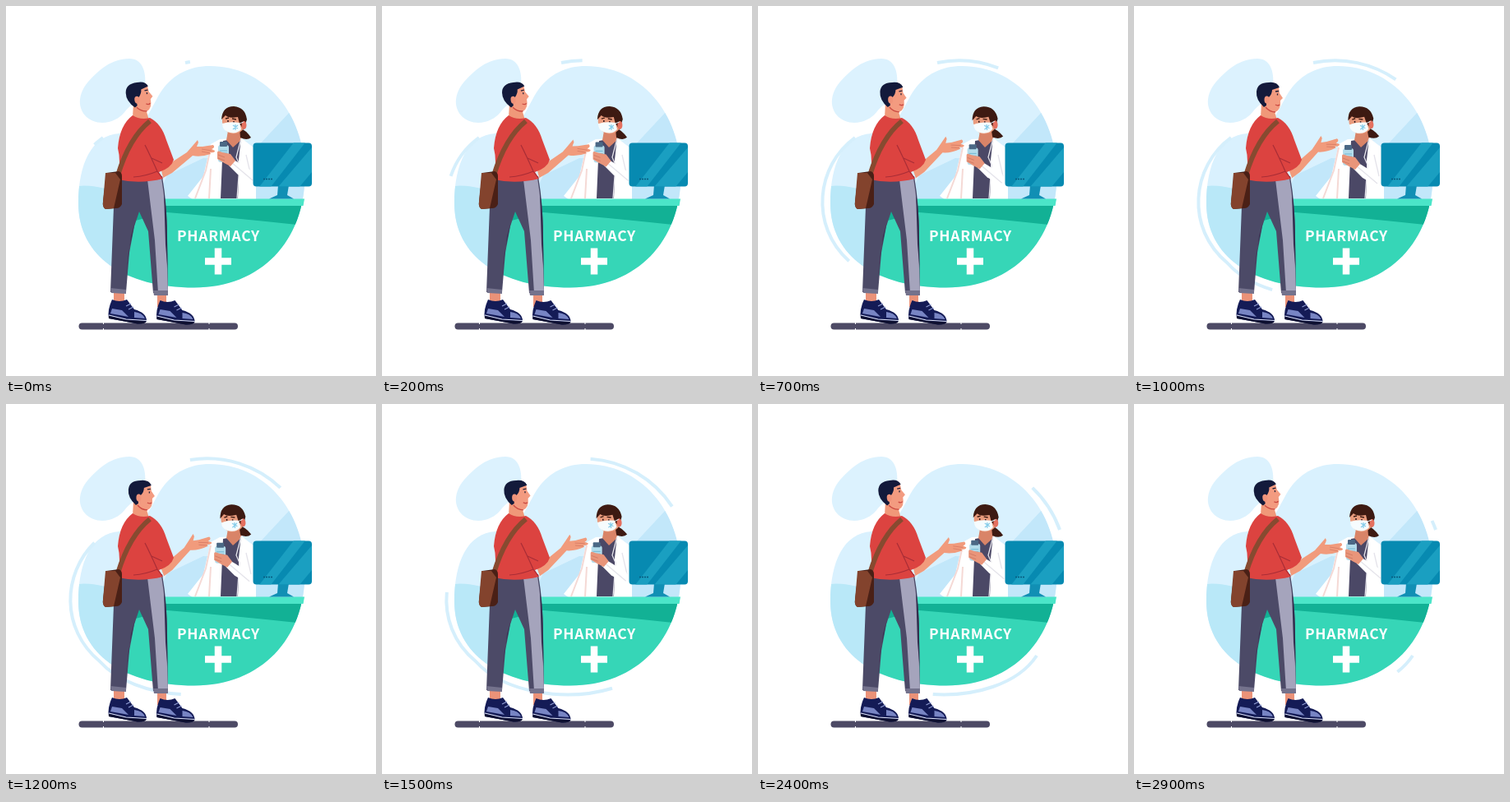
Write an HTML page that moves like this. It is 450 px wide and 450 px high and loops after 3 s.

```html
<!DOCTYPE html>
<html lang="en">
<head>
<meta charset="utf-8">
<title>Pharmacy</title>
<style>
html, body { margin: 0; width: 100%; height: 100%; overflow: hidden; background: #fff; }
svg { display: block; width: 100vw; height: 100vh; }
.arc { fill: none; stroke: #d5effc; stroke-width: 4; }
</style>
</head>
<body>
<svg viewBox="0 0 450 450">
  <defs>
    <clipPath id="blob"><path d="M248 73C313 73 363.5 128 363.5 205C363.5 286 310 342.5 229 342.5C145 342.5 88 305 88 240C88 192 104 157 138 155C170 153 177 120 190 102C204 83 223 73 248 73Z"/></clipPath>
    <clipPath id="screen"><rect x="300.5" y="166.5" width="71.5" height="53" rx="4"/></clipPath>
  </defs>

  <!-- backdrop -->
  <path d="M150 64C166 64 171 80 169 98C167 113 154 117 145 128C133 144 109 147 96 133C86 121 89 105 100 92C113 78 128 64 150 64Z" fill="#dcf2fe"/>
  <g clip-path="url(#blob)">
    <rect x="80" y="65" width="290" height="285" fill="#d9f1fe"/>
    <path d="M180 240L196 206L240 185L290 188L346 128L372 165V240Z" fill="#c2e7fa"/>
    <path d="M80 220Q112 214 150 234V345H80Z" fill="#b9e8f8"/>
    <path d="M146 238H364V345H146Z" fill="#36d6b7"/>
    <path d="M146 243H364L354 266Q270 257 196 251L146 264Z" fill="#12b195"/>
  </g>
  <path class="arc" pathLength="1" d="M218 69C283 56 345 92 367 153"/>
  <path class="arc" pathLength="1" d="M118 160C70 195 62 270 114 313C163 368 298 368 339 306"/>

  <!-- pharmacist -->
  <path d="M260 162L249 168L240 207L221 231L228 236H304V174L286 161Z" fill="#fff"/>
  <path d="M249 172L243 200L230 234M249 198L247 234" fill="none" stroke="#f5d9d5" stroke-width="2"/>
  <path d="M264 164L286 160L283 187V234H261Z" fill="#4b4866"/>
  <path d="M270 152H285L287 162L276 172L268 163Z" fill="#d98468"/>
  <path d="M286 160L302 174V234H282L284 188Z" fill="#fff"/>
  <path d="M286 161L280 184L284 193L281 234M292 181L298 207" fill="none" stroke="#e4e3ea" stroke-width="1.3"/>
  <g id="nurseHead">
    <path d="M284 148Q292 151 298 160Q293 164 285 160Z" fill="#3d1a12"/>
    <path d="M263 133Q276 125 289 133L290 148Q284 157 273 155Q264 152 263 141Z" fill="#e99b7d"/>
    <path d="M262 138Q263 122 277 122Q291 123 293 138L289 150L284 143L282 135Q271 137 267 133Z" fill="#3d1a12"/>
    <ellipse cx="289.5" cy="145" rx="3" ry="5" fill="#e4705f"/>
    <path d="M267 137l4-1M275 137l5 1" stroke="#3d1a12" stroke-width="1.4"/>
    <path d="M270 139v2M277 140v2" stroke="#29151b" stroke-width="1.5"/>
    <path d="M263 143Q272 140 284 142L286 150Q280 157 269 153Q263 150 263 143Z" fill="#f6fcfe"/>
    <path d="M276 145l6 4m0-4l-6 5m3-6v7" stroke="#83cbe9" stroke-width="1.2"/>
    <path d="M284 143l5-2" stroke="#e5f4fa"/>
  </g>
  <g id="bottle">
    <path d="M270 183L282 190L301 202V216L282 205L271 194Z" fill="#fff"/>
    <path d="M274 190L300 212" stroke="#e4e3ea" stroke-width="1.3"/>
    <rect x="258" y="169" width="13" height="21" rx="3" fill="#b3dceb"/>
    <rect x="260" y="165" width="9" height="6" rx="1" fill="#4b6885"/>
    <path d="M260 176h9M260 179h9" stroke="#6fb7d3"/>
    <path d="M257 178Q257 175 263 178L273 180L279 188L273 195Q265 191 257 186Z" fill="#e9957a"/>
    <path d="M258 181l8 3m-8 1l8 3" stroke="#cc7560" stroke-width=".8"/>
  </g>

  <!-- counter and monitor -->
  <path d="M146 234.5H363L361.5 243H146Z" fill="#4be5c8"/>
  <path d="M331 218H344L342 230L350 234.5H320L330 230Z" fill="#118fb4"/>
  <g clip-path="url(#screen)">
    <rect x="300" y="166" width="73" height="54" fill="#078ab1"/>
    <path d="M350 166H364L322 220H308ZM372 172V202L357 220H331Z" fill="#1a9fc1"/>
  </g>
  <path d="M313 210.5h11" stroke="#07597d" stroke-width="1.5" stroke-dasharray="2 1"/>
  <text x="208" y="286" fill="#fff" font-family="'Noto Sans CJK JP', 'Noto Sans CJK SC', Roboto, sans-serif" font-size="17.5" font-weight="900" letter-spacing=".7">PHARMACY</text>
  <path d="M258 294.5V326.5M242 310.5H274" stroke="#fff" stroke-width="8.5"/>

  <!-- ground and shoes -->
  <path d="M92.5 389.5H278" stroke="#4d4a65" stroke-width="8" stroke-linecap="round"/>
  <path d="M118.5 385v2m0 5v2M247 385v2m0 5v2" stroke="#fff"/>
  <path d="M131 344H144V364H131ZM184 346H195V366H184Z" fill="#eb9278"/>
  <g id="shoe">
    <path d="M129 357Q138 361 147 357L156 369Q171 373 171 383Q169 387 160 386.5L125 380Q123 370 129 357Z" fill="#141b56"/>
    <path d="M129 368L141 370L149 378L127 374ZM156 372Q166 373 169 380L156 379Z" fill="#7885c4"/>
    <path d="M125 376L146 381L171 382.5" fill="none" stroke="#dfe4f6" stroke-width="1.2"/>
    <path d="M125 377L146 382L171 383.5Q169 387 160 386.5L125 380Z" fill="#0e1030"/>
    <path d="M146 365l6-3m-3 7l6-3" stroke="#8f9cd3" stroke-width="1.2"/>
  </g>
  <use href="#shoe" x="58.5" y="1"/>

  <!-- customer -->
  <path d="M137 209L190 207Q196 242 196 280L197 349H179L173 274L162 250L156 268L150 300L146 348H127L131 244Z" fill="#4c4a67"/>
  <path d="M172 211L189 209Q195 245 195 290L197 349H185L181 285Z" fill="#a5a4bc"/>
  <path d="M192 226Q196 250 196 285L196.500 320L194 290Z" fill="#322e4e"/>
  <path d="M162 250L172 232M157 262L149 300L146 330L152 280Z" fill="#373454"/>
  <path d="M127 343L146 345V350L128 349ZM179 346H197V352H180Z" fill="#74728c"/>
  <g id="forearm">
    <path d="M187 191L200 191L220 178L227 170L233 163L234 166L232 171L239 171L252 169Q255 172 250 174L254 176Q254 179 248 178L249 180Q237 184 227 182L202 203L191 209Z" fill="#f19b7c"/>
    <path d="M238 174l12 2m-12 1l10 2" stroke="#d67a65" stroke-width=".8"/>
  </g>
  <path d="M155 118H168L174 139Q163 145 154 136Z" fill="#f09879"/>
  <g id="manHead">
    <path d="M160 101L176 98L177 106L181 112L178 115Q179 126 172 129L162 127L157 118Z" fill="#f39b80"/>
    <path d="M149 104Q150 93 164 93Q174 92 177 99L168 102Q168 107 164 111L161 111V121L158 123Q148 114 149 104Z" fill="#131a3b"/>
    <ellipse cx="161.500" cy="114" rx="3" ry="4.5" fill="#f0937a"/>
    <path d="M172 104l4-.5M174.500 106.500v2" stroke="#242037" stroke-width="1.3"/>
    <path d="M172 120q3 2 5 0M160 123Q165 129 172 129" fill="none" stroke="#cb4a42" stroke-width="1.3"/>
  </g>
  <path d="M154 133Q163 139 175 136Q189 143 195 163L204 187Q201 197 186 202L191 210Q163 217 136 211Q140 188 136 173Q138 145 154 133Z" fill="#dc4340"/>
  <path d="M169 169Q176 183 184 201L190 209M177 185L190 191M155 208Q170 207 184 201" fill="none" stroke="#a92d36" stroke-width="1.2"/>
  <path d="M175 140Q150 160 136 206" fill="none" stroke="#874a30" stroke-width="6"/>
  <path d="M122 203L137 201Q141 202 141 207V241Q139 246 134 246L121 247Q117 244 118 238Z" fill="#4a2016"/>
  <path d="M121 203H133L139 211L131 246L121 247Q117 245 118 238Z" fill="#83432d"/>
</svg>
<script>
const LOOP = 3000, STEP = 100, PEAK = 950, TRAVEL = 1880;
const byId = id => document.getElementById(id);
const arcs = document.querySelectorAll('.arc');
const limit = x => Math.max(0, Math.min(1, x));
const rotate = (id, angle, x, y) =>
  byId(id).setAttribute('transform', `rotate(${angle} ${x} ${y})`);

function draw(now) {
  // The picture advances ten times a second
  const t = Math.floor(now % LOOP / STEP) * STEP;
  const head = limit((t + 60) / TRAVEL);
  const tail = limit((t - 1140) / TRAVEL);
  arcs.forEach(arc => arc.setAttribute('stroke-dasharray', `0 ${tail} ${head - tail} 2`));

  // A quick raise of the hand, followed by a slower return
  const phase = t < PEAK ? t / PEAK : (LOOP - t) / (LOOP - PEAK);
  const lift = (1 - Math.cos(Math.PI * phase)) / 2;
  rotate('forearm', -8 * lift, 194, 201);
  rotate('manHead', -7 + 7 * lift, 162, 132);
  rotate('nurseHead', -5 * lift, 279, 157);
  byId('bottle').setAttribute('transform', `translate(${-4 * lift} ${4 * lift})`);
}

function frame() {
  draw(performance.now());
  requestAnimationFrame(frame);
}
frame();
</script>
</body>
</html>
```
